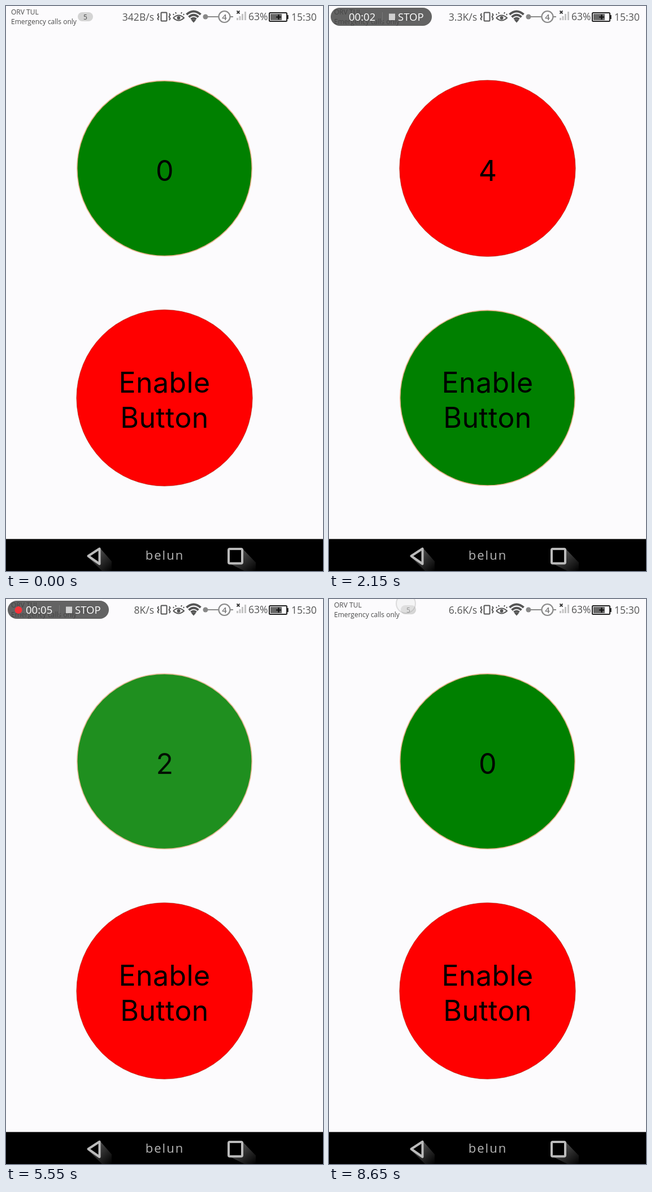
Recreate the animation shown at these times as an HTML page. Size 561 px wide and 998 px high, loop 8.75 s.

```html
<!DOCTYPE html>
<html lang="en">
<head>
<meta charset="utf-8">
<title>Tap counter</title>
<style>
  html, body { margin: 0; height: 100%; overflow: hidden; background: #fcfbfd; }
  svg { display: block; width: 100vw; height: 100vh; font-family: "Open Sans", "Noto Sans", sans-serif; }
  .btn { font: 50px Inter, "Open Sans", sans-serif; letter-spacing: .4px; text-anchor: middle; }
  .small { font-size: 12px; fill: #4a4a4a; }
  .status { font-size: 17.5px; fill: #555; }
  .pill { font-size: 18.5px; fill: #fff; }
  .line { fill: none; stroke: #555; stroke-width: 2; }
</style>
</head>
<body>
<svg viewBox="0 0 561 998">
  <defs>
    <linearGradient id="shade" x2="1" y2="1">
      <stop offset=".3" stop-color="#4a4a4a"/>
      <stop offset="1" stop-color="#000"/>
    </linearGradient>
  </defs>
  <rect width="561" height="998" fill="#fcfbfd"/>

  <g class="small">
    <text x="9" y="15">ORV TUL</text>
    <text x="9" y="32">Emergency calls only</text>
    <rect x="127" y="11" width="27" height="16" rx="8" fill="#d4d4d4"/>
    <text x="140.5" y="23.5" text-anchor="middle">5</text>
  </g>

  <g class="status">
    <text id="speed" x="262" y="26" text-anchor="end"></text>
    <text x="429" y="25">63%</text>
    <text x="505" y="26">15:30</text>
  </g>

  <!-- vibrate, eye, wifi -->
  <g class="line">
    <rect x="274.5" y="11.5" width="10" height="15" rx="1"/>
    <path d="M270 13l-1.5 3 2 3-2 3 1.5 3M289 13l1.5 3-2 3 2 3-1.5 3"/>
    <path d="M296 21q9.5-9 19 0q-9.5 9-19 0M297 16l-1-2M301 13.5l-1-2.5M310 13.5l1-2.5M314 16l1-2"/>
    <path d="M319.5 15q12.5-11 25 0M323.5 19.5q8.5-7.500 17 0M327.5 23.5q4.5-4 9 0" stroke-width="4"/>
  </g>
  <path d="M328 25q4-3 8 0l-4 4.5z" fill="#555"/>
  <circle cx="305.5" cy="21" r="3" fill="#555"/>

  <!-- linked badge -->
  <g stroke="#8a8a8a" stroke-width="2.2" fill="none">
    <path d="M353 19h23M397 19h5"/>
    <circle cx="386.5" cy="19" r="10"/>
  </g>
  <circle cx="353" cy="19" r="4.5" fill="#888"/>
  <text x="386.5" y="24.5" font-size="15" font-weight="600" fill="#777" text-anchor="middle">4</text>

  <!-- signal and battery -->
  <path d="M408.5 8.5l5 5m0-5l-5 5" stroke="#333" stroke-width="1.8"/>
  <path d="M409.5 25v-4M414 25v-7M418.5 25v-11M423.5 25v-15" stroke="#c4c4c4" stroke-width="3"/>
  <rect x="466" y="12" width="31" height="15" rx="1.5" fill="#fcfbfd" stroke="#222" stroke-width="2"/>
  <path d="M498.5 16v7" stroke="#222" stroke-width="2.5"/>
  <rect x="468" y="14" width="20" height="11" fill="#666"/>
  <path d="M478 19.5h9M482.5 15v9" stroke="#111" stroke-width="2.2"/>

  <g id="top" class="btn">
    <circle cx="280.5" cy="286.8"/>
    <text id="count" x="281" y="308.5"></text>
  </g>
  <g id="bottom" class="btn">
    <circle cx="280.5" cy="692.3"/>
    <text x="280.5" y="683">Enable</text>
    <text x="280.5" y="745">Button</text>
  </g>

  <g id="pill" class="pill">
    <rect x="3" y="3" width="179" height="32" rx="16" fill="#434343" opacity=".82"/>
    <circle id="dot" cx="22" cy="19.5" r="6.5" fill="#f6333a"/>
    <text id="clock" x="35" y="26"></text>
    <path d="M94.5 11v17" stroke="#777"/>
    <rect x="106" y="13.5" width="11" height="11.5" fill="#d0d0d0"/>
    <text x="122" y="26">STOP</text>
  </g>

  <!-- navigation bar -->
  <rect y="941.5" width="561" height="56.5" fill="#000"/>
  <path d="M166 957l21 24v17h-17l-26-26z" fill="url(#shade)"/>
  <path d="M419 959l23 24v15h-20l-28-14z" fill="url(#shade)"/>
  <g stroke="#bbb" stroke-width="4" stroke-linejoin="round" fill="#000">
    <path d="M145.5 971.5l20-13v27z"/>
    <rect x="394" y="959" width="24" height="25.5" rx="2"/>
  </g>
  <text x="281" y="978" font-size="22" letter-spacing="2" fill="#b8b8b8" text-anchor="middle">belun</text>

  <g id="touch">
    <circle r="20" fill="#fff" opacity=".15"/>
    <circle r="17" fill="#e8e8e8" fill-opacity=".57" stroke="#888" stroke-opacity=".35" stroke-width="2"/>
  </g>
</svg>

<script>
const LOOP = 8750, STEP = 50, SECOND = 950, LIMIT = 4;
const PILL_ON = 250, PILL_OFF = 8600;
const $ = id => document.getElementById(id);

// release time, control, x, y, hold
const taps = [
  [430, "top", 374, 326], [865, "top", 377, 323], [1330, "top", 374, 320], [1760, "top", 372, 322],
  [2350, "bottom", 330, 632],
  [2740, "top", 366, 338], [3020, "top", 364, 334], [3290, "top", 362, 332], [3560, "top", 362, 330],
  [4110, "bottom", 322, 630],
  [4850, "top", 358, 351], [5370, "top", 357, 335], [5860, "top", 356, 318], [6340, "top", 356, 306],
  [7100, "bottom", 319, 625],
  [PILL_OFF, "stop", 136, 8, 300]
].map(([at, on, x, y, hold = 150]) => ({ at, on, x, y, hold }));

const speeds = [[0, "342B/s"], [1100, "3.3K/s"], [4050, "8K/s"], [7050, "6.6K/s"]];

const styles = {
  on: { r: 154.7, fill: "#008000", stroke: "#e8b48c", "stroke-width": 1.6 },
  off: { r: 155.7, fill: "#f00", stroke: "#a03018", "stroke-width": .6 }
};

const set = (el, attrs) => {
  for (const name in attrs) el.setAttribute(name, attrs[name]);
};

const ease = u => {
  u = Math.min(1, Math.max(0, u));
  return u < .5 ? 2 * u * u : 1 - 2 * (1 - u) ** 2;
};

// dims while held, recovers after release
function pressOpacity(tap, t) {
  const d = t - tap.at;
  return d < 0 ? 1 - .8 * ease((d + tap.hold) / 150) : .2 + .8 * ease(d / 250);
}

// disc and label fade separately, so the label stays dark over the disc
function drawButton(id, enabled, t) {
  const own = taps.filter(tap => tap.on === id);
  const opacity = Math.min(...own.map(tap => pressOpacity(tap, t)));
  set($(id).querySelector("circle"), enabled ? styles.on : styles.off);
  for (const part of $(id).children) set(part, { opacity });
}

function drawTouch(t) {
  const tap = taps.findLast(p => t >= p.at - p.hold - 20);
  const alpha = tap ? Math.min(1, 1 - (t - tap.at) / 180) : 0;
  set($("touch"), { opacity: Math.max(0, alpha) });
  if (tap) set($("touch"), { transform: `translate(${tap.x} ${tap.y})` });
}

function draw(t) {
  let count = 0;
  for (const tap of taps) {
    if (tap.at > t) break;
    if (tap.on === "top") count++;
    if (tap.on === "bottom") count = 0;
  }
  $("count").textContent = count;
  drawButton("top", count < LIMIT, t);
  drawButton("bottom", count >= LIMIT, t);

  const elapsed = Math.max(0, (t - 100) / SECOND);
  $("pill").style.display = t >= PILL_ON && t < PILL_OFF ? "" : "none";
  $("clock").textContent = "00:0" + Math.floor(elapsed);
  $("dot").style.display = elapsed % 1 >= .5 ? "" : "none";
  $("speed").textContent = speeds.findLast(s => t >= s[0])[1];
  drawTouch(t);
}

const start = performance.now();
function tick() {
  const t = (performance.now() - start) % LOOP;
  draw(Math.floor(t / STEP) * STEP);
  requestAnimationFrame(tick);
}
tick();
</script>
</body>
</html>
```
